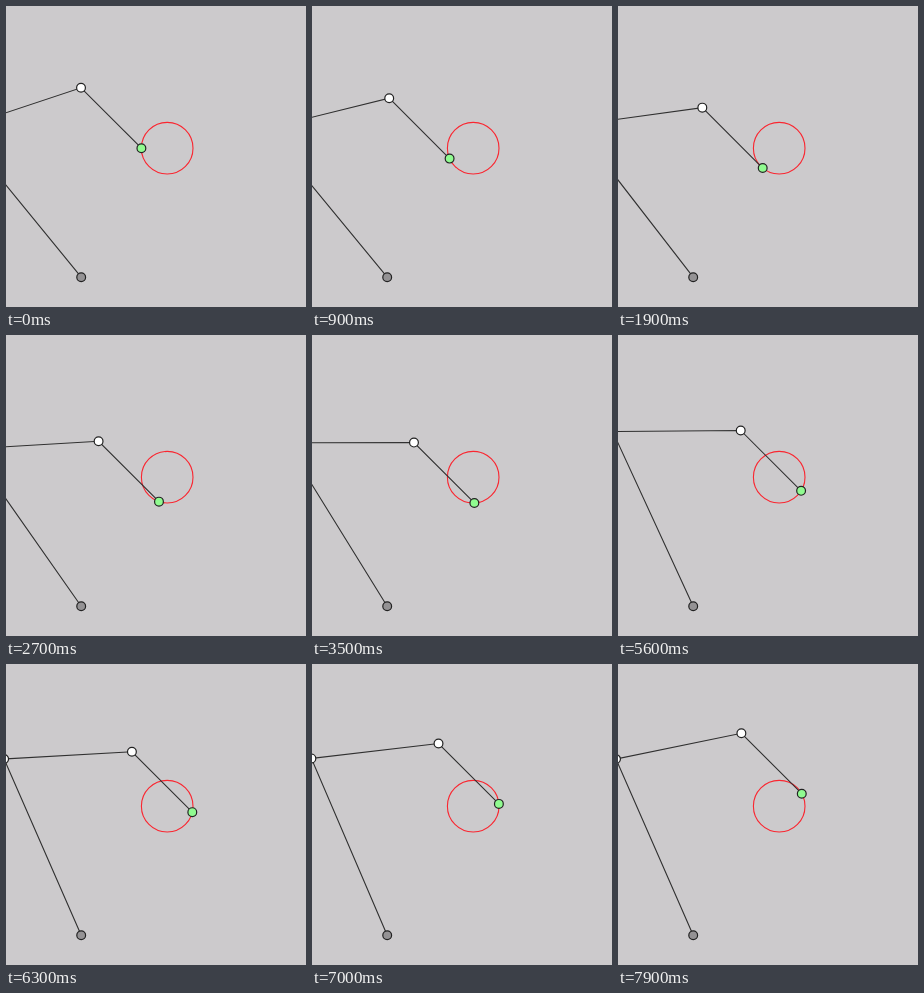
An HTML page that plays this animation: 300x301 px, repeating every 8000 ms.

```html
<!DOCTYPE html>
<html lang="en">
<head>
<meta charset="utf-8">
<title>Three-link arm tracing a circle</title>
<style>
  html, body { margin: 0; width: 100%; height: 100%; overflow: hidden; background: #cccacc; }
  svg { display: block; width: 100%; height: 100%; }
  polyline { fill: none; stroke: #303030; stroke-width: 1.1; }
  .joint { stroke: #222; stroke-width: 1.2; }
</style>
</head>
<body>
<svg viewBox="0 0 300 301">
  <circle id="path" fill="none" stroke="#fa2630" stroke-width="1.1"/>
  <polyline id="arm"/>
  <circle class="joint" r="4.4" fill="#949294"/>
  <circle class="joint" r="4.4" fill="#fff"/>
  <circle class="joint" r="4.4" fill="#fff"/>
  <circle class="joint" r="4.4" fill="#90fb90"/>
</svg>
<script>
const LOOP = 8000, STEP = 100;
const DEG = Math.PI / 180;
const SPEED = 26.45 * DEG / 1000;
const base = { x: 75.2, y: 271.2 };
const target = { x: 161.2, y: 142.2, r: 25.8 };
const upper = 192.3, fore = 128, hand = 85.4;

const path = document.getElementById('path');
const arm = document.getElementById('arm');
const joints = document.querySelectorAll('.joint');

function place(circle, p) {
  circle.setAttribute('cx', p.x);
  circle.setAttribute('cy', p.y);
}

const polar = (p, length, angle) => ({
  x: p.x + length * Math.cos(angle),
  y: p.y + length * Math.sin(angle)
});

// Two-link inverse kinematics, elbow to the left; the hand keeps a 45° tilt.
function pose(time) {
  const tip = polar(target, target.r, Math.PI - SPEED * time);
  const wrist = polar(tip, -hand, 45 * DEG);
  const dx = wrist.x - base.x, dy = wrist.y - base.y;
  const reach = Math.hypot(dx, dy);
  const bend = Math.acos((upper ** 2 + reach ** 2 - fore ** 2) / (2 * upper * reach));
  const elbow = polar(base, upper, Math.atan2(dy, dx) - bend);
  return [base, elbow, wrist, tip];
}

function draw(time) {
  const points = pose(Math.floor(time / STEP) * STEP);
  arm.setAttribute('points', points.map(p => `${p.x},${p.y}`).join(' '));
  points.forEach((p, i) => place(joints[i], p));
}

place(path, target);
path.setAttribute('r', target.r);
draw(0);

let start;
function tick(now) {
  start ??= now;
  draw((now - start) % LOOP);
  requestAnimationFrame(tick);
}
requestAnimationFrame(tick);
</script>
</body>
</html>
```
